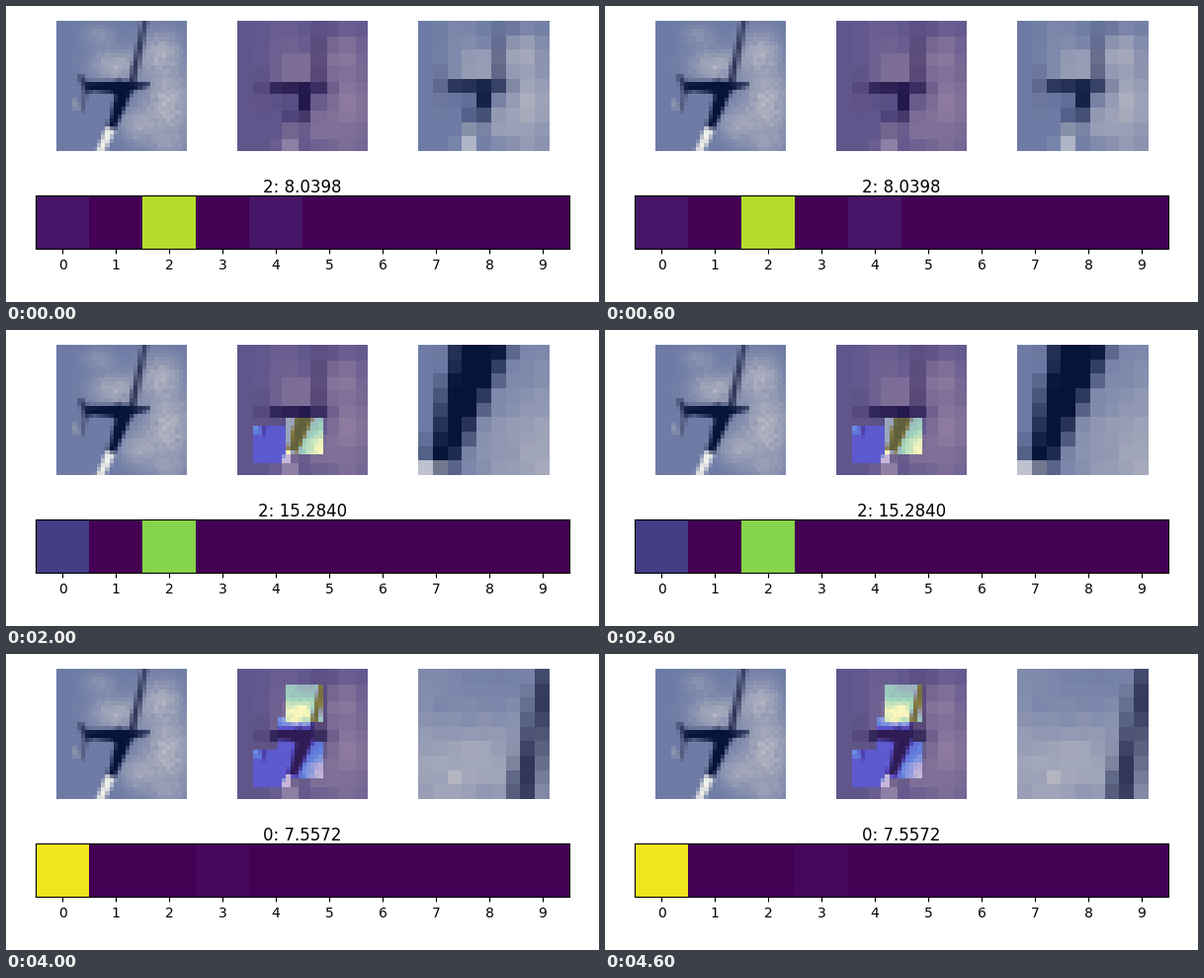
A matplotlib script for the animation above (5000 ms loop, 600 by 300 pixels).

```python
import numpy as np
import matplotlib.pyplot as plt
from matplotlib.animation import FuncAnimation

W, H, DPI = 600, 300, 100
N, G = 32, 9  # picture size and glimpse size in cells

# Column and row of each glimpse; the first step sees only the coarse picture.
GLIMPSES = [(4, 20), (12, 18), (10, 12), (12, 4)]
TITLES = ["2: 8.0398", "2: 13.6895", "2: 15.2840", "0: 10.9111", "0: 7.5572"]
SCORES = [
    {0: .055, 2: .89, 4: .055},
    {0: .02, 1: .004, 2: .98},
    {0: .18, 2: .82},
    {0: .995},
    {0: .98, 3: .02},
]

# Tone ramps by brightness, for the newest glimpse and for older ones.
LEVELS = [.10, .36, .47, .57, .66]
FRESH = [(98, 97, 62), (135, 126, 66), (152, 157, 188), (158, 212, 190), (251, 247, 188)]
STALE = [(48, 28, 84), (74, 62, 160), (92, 82, 204), (100, 134, 224), (200, 182, 216)]
TINT = np.array([68, 1, 84]) / 255

Y, X = np.mgrid[:N, :N].astype(float)


def rgb(*c):
    return np.array(c) / 255


def blob(cx, cy, sx, sy, amount):
    return amount * np.exp(-((X - cx) / sx) ** 2 - ((Y - cy) / sy) ** 2)


def stroke(img, p, q, r0, r1, color, alpha=1):
    """Blend a soft tapered line into the picture."""
    (x0, y0), (x1, y1) = p, q
    dx, dy = x1 - x0, y1 - y0
    t = np.clip(((X - x0) * dx + (Y - y0) * dy) / (dx * dx + dy * dy), 0, 1)
    dist = np.hypot(X - x0 - t * dx, Y - y0 - t * dy) - (r0 + t * (r1 - r0))
    cover = alpha * np.clip(.5 - dist / 1.3, 0, 1)[..., None]
    return img * (1 - cover) + color * cover


def make_picture():
    rng = np.random.default_rng(4)
    cloud = (blob(27, 20, 6, 9, .95) + blob(14, 10.5, 6, 4, .85)
             + blob(25, 7, 5, 5, .75) + blob(19, 25, 4, 4, .65)
             + blob(10, 3, 4, 2.5, .4) + blob(27, 30, 6, 3, .3))
    cloud = np.clip(cloud, 0, 1) * (1 + rng.normal(0, .1, (N, N)))
    blue, grey = rgb(109, 123, 165), rgb(178, 179, 192)
    img = blue + cloud[..., None] * (grey - blue)

    navy, slate = rgb(7, 20, 58), rgb(48, 55, 90)
    img = stroke(img, (4, 19.5), (4.5, 21), .4, .4, rgb(165, 165, 175), .8)
    img = stroke(img, (6.6, 17), (5.8, 21.5), .5, .2, rgb(70, 76, 106), .9)
    img = stroke(img, (5.5, 13.4), (7.2, 16.5), .6, 1, slate)
    img = stroke(img, (21.3, -1), (18.3, 14), .5, .9, slate)
    img = stroke(img, (12.6, 26.6), (10.3, 31.5), 1, .9, rgb(240, 240, 234))
    img = stroke(img, (16, 17), (13.3, 25), 1.9, 1, navy)
    img = stroke(img, (7.5, 15.5), (15, 16), 1, 1.7, navy)
    img = stroke(img, (15, 16), (21.8, 15.2), 1.8, .4, navy)
    return np.clip(img, 0, 1)


def crop(img, col, row):
    return img[row:row + G, col:col + G]


def toned(patch, ramp):
    light = patch @ [.299, .587, .114]
    return np.stack([np.interp(light, LEVELS, ch) for ch in zip(*ramp)], -1) / 255


picture = make_picture()
coarse = picture.repeat(G, 0).repeat(G, 1).reshape(G, N, G, N, 3).mean((1, 3))
near = np.arange(N) * G // N
backdrop = .7 * coarse[near][:, near] + .3 * TINT


def memory(step):
    view = backdrop.copy()
    for i, (col, row) in enumerate(GLIMPSES[:step]):
        ramp = FRESH if i == step - 1 else STALE
        crop(view, col, row)[:] = toned(crop(picture, col, row), ramp)
    return view


def focus(step):
    return crop(picture, *GLIMPSES[step - 1]) if step else coarse


def scores(step):
    return np.array([[SCORES[step].get(k, 0) for k in range(10)]])


fig = plt.figure(figsize=(W / DPI, H / DPI), dpi=DPI, facecolor="white")


def panel(x, y, w, h):
    return fig.add_axes([x / W, 1 - (y + h) / H, w / W, h / H])


def show(x, img):
    ax = panel(x, 15, 132, 132)
    ax.axis("off")
    return ax.imshow(img, interpolation="nearest")


show(51, picture)
mem_im = show(234, memory(0))
focus_im = show(417, focus(0))

bar = panel(30, 192, 540, 54)
bar_im = bar.imshow(scores(0), cmap="viridis", vmin=0, vmax=1,
                    interpolation="nearest", aspect="auto")
bar.set_xticks(range(10))
bar.set_yticks([])
title = fig.text(.5, 1 - 189 / H, TITLES[0], fontsize=12, ha="center", va="baseline")


def update(step):
    mem_im.set_data(memory(step))
    focus_im.set_data(focus(step))
    bar_im.set_data(scores(step))
    title.set_text(TITLES[step])
    return mem_im, focus_im, bar_im, title


anim = FuncAnimation(fig, update, frames=5, interval=1000, repeat=True, repeat_delay=0)
plt.show()
```
